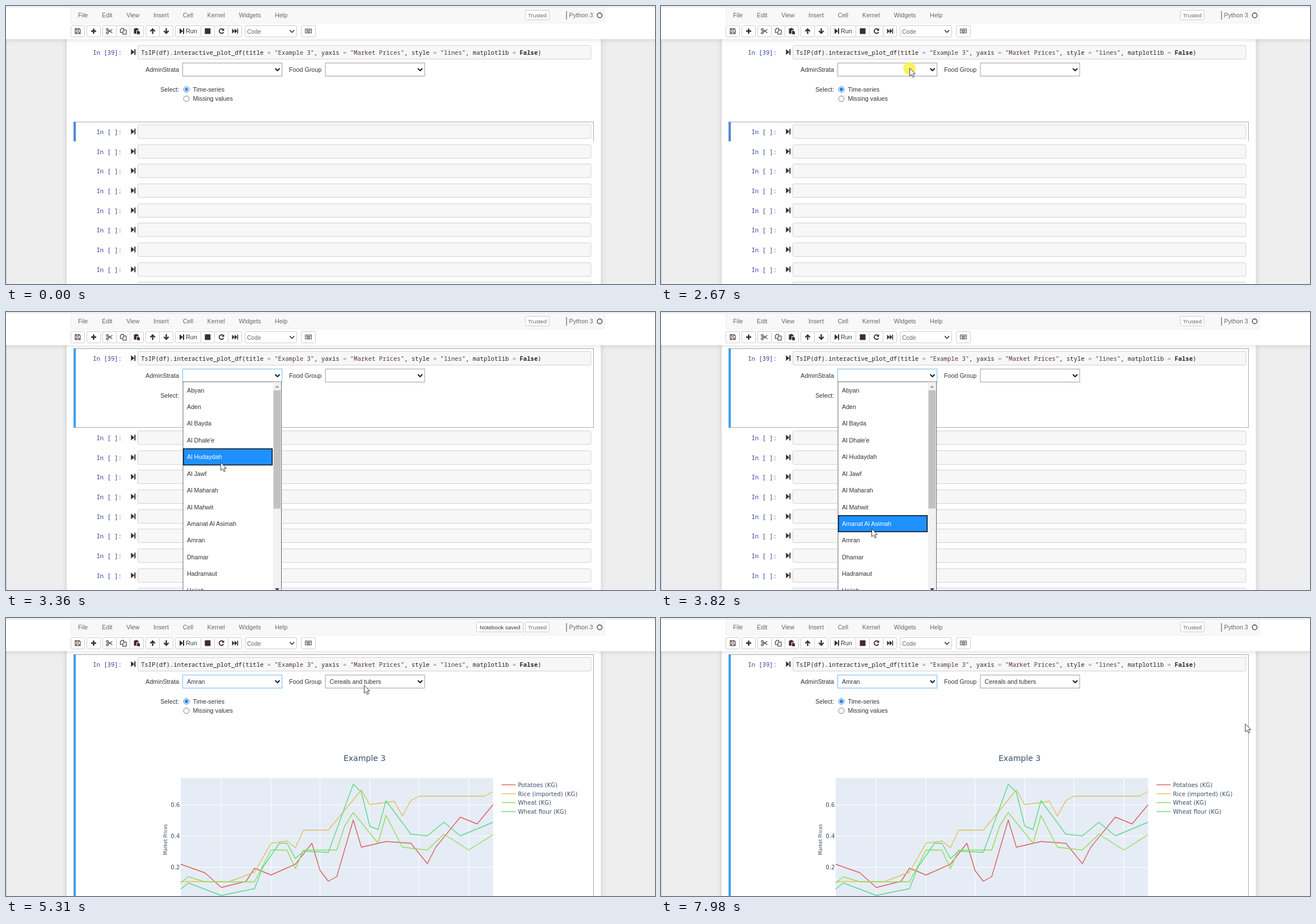
These frames come from a looping animation (1144x490 px, 8 s). An HTML page:

```html
<!DOCTYPE html>
<html lang="en">
<head>
<meta charset="utf-8">
<title>Notebook</title>
<style>
html, body { margin: 0; width: 100%; height: 100%; overflow: hidden; background: #eee; }
svg { display: block; width: 1144px; height: 490px; }
text { font: 10.73px "Liberation Sans", Arial, sans-serif; white-space: pre; fill: #333; }
.mono { font: 10.6px "Noto Sans Mono", Consolas, monospace; fill: #2b2323; }
.plot { font: 10.18px "DejaVu Sans", Verdana, sans-serif; fill: #3a4d6b; }
.prompt { fill: #303f9f; }
.str { fill: #523a3c; }
.op { fill: #95809f; }
.menu { fill: #666; }
.small { font-size: 9.9px; text-anchor: middle; }
.icon { fill: #402b2b; }
.line { fill: none; stroke: #402b2b; stroke-width: 1.1; }
.shade { filter: drop-shadow(0 0 5px rgba(87, 87, 87, .25)); }
</style>
</head>
<body>
<svg id="stage" viewBox="0 0 1144 490"></svg>
<script>
const LOOP = 8000, FIRST = 110, BEAT = 77.6;
const ROW = 29.42, LIST_TOP = 123;
const places = ["Abyan", "Aden", "Al Bayda", "Al Dhale'e", "Al Hudaydah", "Al Jawf", "Al Maharah",
  "Al Mahwit", "Amanat Al Asimah", "Amran", "Dhamar", "Hadramaut", "Hajjah"];

// Pointer moves: start, end, x, y; it rests in between
const origin = [888, 449];
const moves = [[110, 880, 401, 164], [880, 1030, 410, 155], [1185, 1260, 419, 144], [1260, 1490, 534, 185],
  [1490, 1800, 401, 115], [1960, 2110, 287, 111], [2285, 2590, 438, 109], [2820, 3130, 425, 165],
  [3130, 3350, 378.5, 260], [3350, 3900, 370, 398], [4290, 4910, 581, 146], [4910, 5310, 631, 118],
  [6165, 6240, 637, 117], [6240, 7020, 662, 156], [7020, 7890, 1001, 190], [7890, 7980, 1045.5, 184]];

const attrs = o => Object.entries(o).map(([k, v]) => ` ${k}="${v}"`).join("");
const rect = (x, y, w, h, fill, stroke = "none", more = {}) =>
  `<rect${attrs({ x, y, width: w, height: h, fill, stroke, ...more })}/>`;
const text = (x, y, s, cls = "", more = {}) => `<text${attrs({ x, y, class: cls, ...more })}>${s}</text>`;
const draw = (d, cls = "icon", more = {}) => `<path${attrs({ d, class: cls, ...more })}/>`;
const group = (id, body) => `<g id="${id}">${body}</g>`;
const at = (x, y, body) => `<g transform="translate(${x} ${y})">${body}</g>`;
const pen = (stroke, width) => ({ fill: "none", stroke, "stroke-width": width, "stroke-linejoin": "round" });
const chevron = (x, y, w = 2) => draw(`M${x - 4} ${y - 2}l4 4l4 -4`, "", pen("#1c1c1c", w));
const box = (x, y, w, h) => rect(x, y, w, h, "#fff", "#ccc", { rx: 2 });
const stepIcon = draw("M-4 -5l6 5l-6 5zM2 -5h2v10h-2z");
const arrow = draw("M0 -5.3l5 5l-1.6 1.5l-2.2 -2.2v6h-2.4v-6l-2.2 2.2l-1.6 -1.5z");

// Icons are drawn around their button's centre
const toolGroups = [
  [draw("M-4.5 -4.5h7l2 2v7h-9zM-2.5 -4.5v3h4v-3M-2.5 4.5v-3h5v3", "line")],
  [draw("M-4.5 0h9M0 -4.5v9", "line", { style: "stroke-width:2.6" })],
  [draw("M-3 -2L5 3M-3 2L5 -3", "line") + [-3, 3].map(y => `<circle class="line" cx="-4" cy="${y}" r="1.8"/>`).join(""),
    draw("M-1 2.5h-4v-5l2.500 -2.500h3.500v3M-.5 .5l2.500 -2.500h3.500v7.500h-6z", "line"),
    draw("M-5 -4.500h2.500v-1h3v1h2.500v3h-3.500v6h-4.500zM.5 -.5h3l2 2v4h-5z")],
  [arrow, `<g transform="scale(1 -1)">${arrow}</g>`],
  [at(-11, 0, stepIcon) + text(-4, 4, "Run"), rect(-5, -5, 10, 10, "#402b2b"),
    draw("M3.500 -2.500a4 4 0 1 0 .5 4", "line", { style: "stroke-width:1.8" }) + draw("M5 -5v4.500h-4.500z"),
    draw("M-5 -4.500l4.500 4.500l-4.500 4.500zM-.5 -4.500l4.500 4.500l-4.500 4.500zM4 -4.500h1.600v9h-1.600z")]
];

function toolbar() {
  let x = 114.5, out = "";
  for (const tools of toolGroups) {
    tools.forEach((icon, i) => {
      const w = tools.length === 4 && i === 0 ? 45 : 24;
      out += box(x, 34.5, w, 20) + at(x + w / 2, 44.3, icon);
      x += w;
    });
    x += 4;
  }
  return out + box(421.5, 34.5, 91, 20) + text(425, 48.7, "Code", "menu", { style: "font-size:10.2px" }) + chevron(504, 44.5, 1.3) +
    box(520.5, 34.5, 25, 20) + draw("M527.500 40.500h11v7h-11zM529 42.700h8M529 44.200h8M530.500 46h5", "line", { style: "stroke-width:.9" });
}

function header() {
  const menus = ["File", "Edit", "View", "Insert", "Cell", "Kernel", "Widgets", "Help"];
  return rect(-20, -20, 1184, 78.5, "#fff", "none", { class: "shade" }) +
    rect(0, 1, 1144, 1, "#d4d4d4") + rect(114.5, 2, 940.5, 28, "#f8f8f8", "#ececec", { rx: 2 }) +
    text(127, 20.3, menus.map((s, i) => `<tspan dx="${i ? 24.75 : 0}">${s}</tspan>`).join(""), "menu") +
    box(915.5, 7.5, 42, 17) + text(936.5, 20, "Trusted", "small menu") +
    rect(987.5, 9, 1, 15, "#444") + text(992.5, 20.3, "Python 3", "menu") +
    `<circle id="kernel" cx="1046.5" cy="16.5" r="4.2" stroke="#444" stroke-width="1.4"/>` +
    group("saved", box(829.5, 7.5, 82, 17) + text(870.7, 20, "Notebook saved", "small")) + toolbar();
}

function cell(y, n = " ", code = "") {
  return text(204, y + 16.2, `In [${n}]:`, "mono prompt", { "text-anchor": "end" }) + at(224.3, y + 11.7, stepIcon) +
    rect(232.5, y, 798.5, 24, "#f7f7f7", "#d2d2d2", { rx: 2 }) + text(238, y + 16, code, "mono");
}

function codeCell() {
  const eq = ` <tspan class="op">=</tspan> `;
  const str = s => `<tspan class="str">"${s}"</tspan>`;
  return cell(69.5, 39, `TsIP(df).interactive_plot_df(title${eq}${str("Example 3")}, yaxis${eq}${str("Market Prices")}, ` +
    `style${eq}${str("lines")}, matplotlib${eq}<tspan font-weight="700">False</tspan>)`);
}

function controls() {
  const select = (x, id) => rect(x, 100.5, 175, 23, "#fff", "#9e9e9e", { id }) + chevron(x + 167, 112);
  const radio = (y, id, label) => `<circle id="${id}" cx="318" cy="${y}" r="4.9" fill="#fff" stroke="#777"/>` + text(329.5, y + 3.7, label);
  return text(246, 115.8, "AdminStrata") + text(499, 115.8, "Food Group") +
    text(305, 150.7, "Select:", "", { "text-anchor": "end" }) + select(311.5, "area") + select(563, "food") +
    group("values", text(319, 115.8, "Amran") + text(570.5, 115.8, "Cereals and tubers")) +
    radio(147, "series", "Time-series") + radio(163.5, "missing", "Missing values") + `<circle id="dot" cx="318" cy="147" r="2.9"/>`;
}

// Turning points of each price line: month, y
const prices = [
  ["Potatoes (KG)", "#db5f57", [[0, 434], [3, 449], [5, 475], [8, 464], [9, 441], [11, 453], [14, 434], [16, 397], [17, 445], [18, 464],
    [19, 456], [21, 356], [22, 404], [25, 394], [28, 397], [30, 433], [31, 404], [34, 351], [36, 363], [38, 329]]],
  ["Rice (imported) (KG)", "#dbc257", [[0, 464.5], [6, 464.5], [9, 448], [11, 397], [13, 393], [14, 405], [15, 374], [18, 374],
    [22, 303], [23, 329], [26, 323], [27, 349], [28, 322], [29, 314], [37, 314], [38, 306]]],
  ["Wheat (KG)", "#91db57", [[0, 467], [1, 456], [3, 465], [9, 465], [11, 409], [13, 409], [14, 442], [15, 409], [19, 409],
    [20, 366], [21, 343], [24, 397], [25, 348], [27, 404], [30, 409], [32, 381], [35, 409], [38, 382]]],
  ["Wheat flour (KG)", "#57db80", [[0, 478], [1, 467], [5, 489], [9, 477], [10, 440], [12, 397], [13, 397], [14, 424], [15, 411],
    [18, 413], [21, 293], [22, 307], [23, 367], [24, 373], [25, 322], [28, 381], [30, 384], [32, 360], [34, 384], [38, 360]]]
];

function chart() {
  const month = k => Date.UTC(2018, 1 + k);
  const px = k => +(308 + 550.5 * (month(k) - month(0)) / (month(38) - month(0))).toFixed(1);
  let out = text(632, 252.2, "Example 3", "plot", { "text-anchor": "middle", style: "font-size:14px" }) +
    rect(308, 282, 550.5, 220, "#e5ecf6");
  for (let k = 5; k < 38; k += 6) out += rect(px(k) - .5, 282, 1, 220, "#fff");
  for (let i = 0; i < 3; i++) {
    const y = 329.8 + i * 54.8;
    out += rect(308, y - .5, 550.5, 1, "#fff") + text(306.5, y + 3.6, (.6 - i * .2).toFixed(1), "plot", { "text-anchor": "end" });
  }
  out += at(283.5, 390.5, text(0, 0, "Market Prices", "plot", { "text-anchor": "middle", style: "font-size:8.1px", transform: "rotate(-90)" }));
  prices.forEach(([name, color, points], i) => {
    const y = 294 + i * 15.75;
    out += draw("M" + points.map(([k, v]) => `${px(k)} ${v}`).join("L"), "", pen(color, 1.4)) +
      draw(`M873.5 ${y}h25`, "", pen(color, 1.4)) + text(902.5, y + 3.8, name, "plot");
  });
  return out;
}

function list() {
  return rect(312, LIST_TOP, 173.5, 380, "#fff", "#6a6a6a") +
    rect(312.8, 0, 156.4, ROW - 1, "#1e90ff", "#101820", { id: "hover", "stroke-width": 1.6 }) +
    places.map((s, i) => text(319, LIST_TOP + ROW * (i + .5) + 3.9, s, "place")).join("") +
    rect(470.5, 123.5, 14.5, 370, "#f1f1f1") + rect(471.5, 138, 12.5, 208.5, "#c1c1c1") +
    draw("M474 133.5l4 -4l4 4z", "", { fill: "#a3a3a3" }) + draw("M474 487l4 4l4 -4z", "", { fill: "#333" });
}

const stage = document.getElementById("stage");
stage.innerHTML =
  rect(0, 0, 1144, 490, "#eee") + rect(107, 40, 941.5, 480, "#fff", "none", { class: "shade" }) + rect(0, 0, 1, 490, "#c4c4c4") +
  group("cells", Array.from({ length: 9 }, (_, i) => cell(Math.round(209 + i * 34.65) + .5)).join("")) +
  group("below", draw("M121 204.5H1035.5V238.5", "", pen("#ababab", 1)) + rect(119, 204, 4.2, 34.5, "#568bd2")) +
  group("above", rect(119.5, 64.5, 916, 139, "none", "#ababab", { id: "frame" }) + rect(119, 64, 4.2, 140, "#45a1ee", "none", { id: "bar" })) +
  codeCell() + controls() + group("chart", chart()) + header() + group("list", list()) +
  `<circle id="click" r="11" fill="#fbf04e" opacity=".88"/>` +
  draw("M.5 .5V14.5L3.8 11.5L6 16.6L8.3 15.6L6.1 10.6H10.3Z", "", { id: "pointer", fill: "#fff", stroke: "#3a3a3a", "stroke-linejoin": "round" });

const el = {};
stage.querySelectorAll("[id]").forEach(n => el[n.id] = n);
const labels = stage.querySelectorAll(".place");
const show = (n, on) => n.style.display = on ? "" : "none";

function pointerAt(t) {
  let [x, y] = origin;
  for (const [a, b, u, v] of moves) {
    const k = Math.max(0, Math.min(1, (t - a) / (b - a)));
    x += (u - x) * k;
    y += (v - y) * k;
  }
  return [x, y];
}

function render(time) {
  // The screen refreshes in even beats
  const t = FIRST + Math.floor((time - FIRST) / BEAT + .2) * BEAT;
  const [x, y] = pointerAt(t);
  const during = (a, b) => t >= a && t < b;
  const opened = t >= 2800, chosen = t >= 4270, grown = t >= 5140;

  show(el.pointer, t >= FIRST);
  el.pointer.setAttribute("transform", `translate(${x.toFixed(2)} ${y.toFixed(2)})`);
  show(el.click, during(2570, 2800) || during(4270, 4430));
  el.click.setAttribute("cx", x);
  el.click.setAttribute("cy", y + 1);

  show(el.list, opened && !chosen);
  const row = y > LIST_TOP ? Math.floor((y - LIST_TOP) / ROW) : -1;
  show(el.hover, row >= 0);
  el.hover.setAttribute("y", LIST_TOP + .5 + row * ROW);
  labels.forEach((n, i) => n.style.fill = i === row ? "#fff" : "");

  show(el.below, !opened);
  show(el.above, opened);
  show(el.cells, !grown);
  el.frame.setAttribute("height", grown ? 440 : 139);
  el.bar.setAttribute("height", grown ? 440 : 140);
  el.area.setAttribute("stroke", opened ? "#72b9f2" : "#9e9e9e");
  show(el.values, chosen);
  show(el.chart, t >= 5290);
  show(el.saved, during(4590, 6600));
  el.kernel.setAttribute("fill", chosen && !grown ? "#555" : "#fff");

  const blue = during(1240, 1640) ? "#0d5fc4" : t < 1240 ? "#4286da" : "#1f78e0";
  el.series.setAttribute("stroke", blue);
  el.dot.setAttribute("fill", blue);
  el.missing.setAttribute("stroke", during(800, 940) ? "#444" : "#777");
}

function tick() {
  render(performance.now() % LOOP);
  requestAnimationFrame(tick);
}
tick();
</script>
</body>
</html>
```
